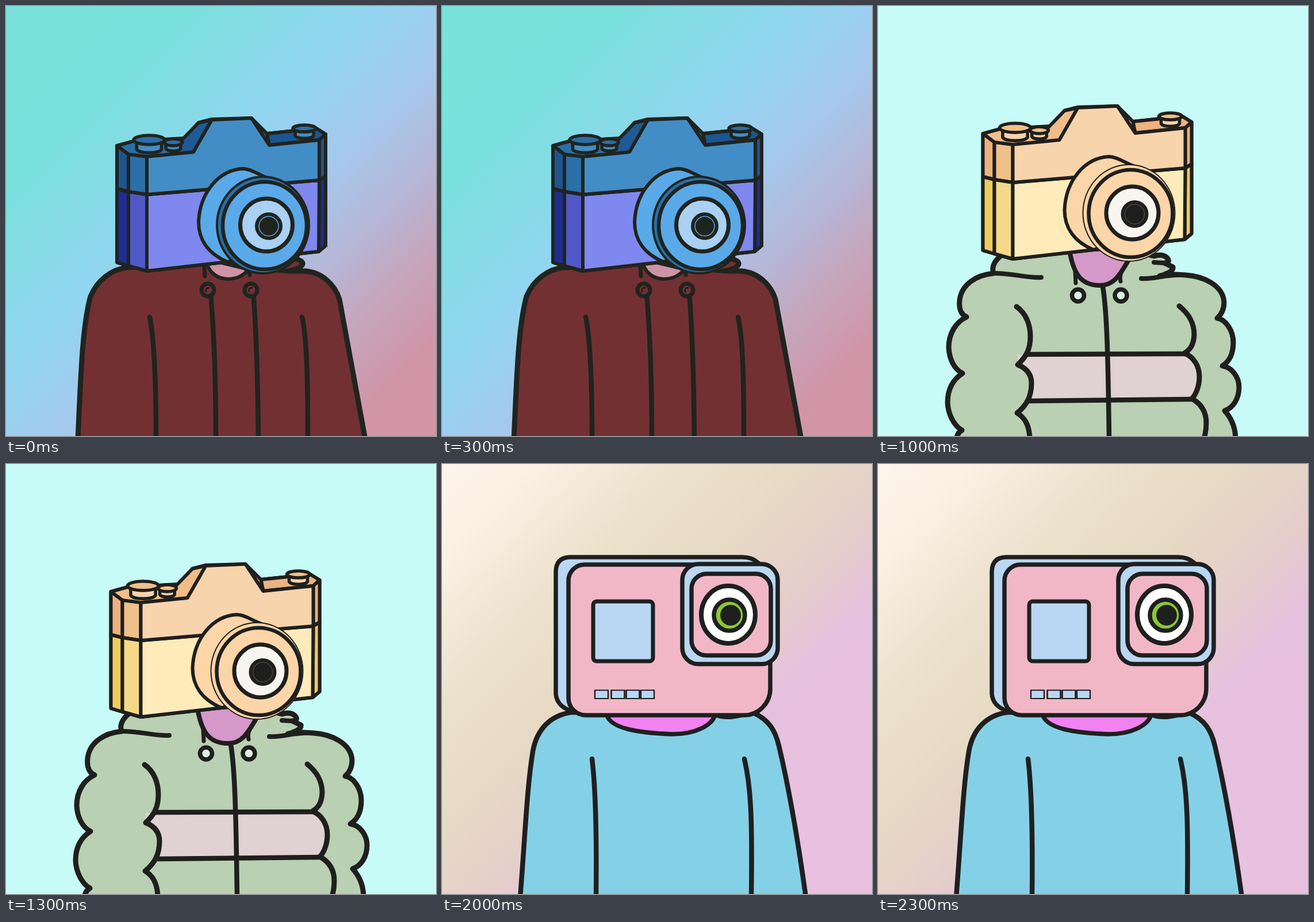
These frames come from a looping animation (748 by 748 pixels, 2500 ms). An HTML page with a canvas:

```html
<!DOCTYPE html>
<html>
<head>
<meta charset="utf-8">
<style>
  html, body { margin: 0; width: 100%; height: 100%; overflow: hidden; }
  canvas { display: block; }
</style>
</head>
<body>
<canvas id="stage" width="748" height="748"></canvas>
<script>
const SIZE = 748, HOLD = 500;
const ctx = document.getElementById('stage').getContext('2d');
ctx.lineJoin = ctx.lineCap = 'round';
let ink = '#20231f';

function paint(path, fill, width) {
  if (fill) { ctx.fillStyle = fill; ctx.fill(path); }
  if (width) { ctx.strokeStyle = ink; ctx.lineWidth = width; ctx.stroke(path); }
}
const shape = (d, fill, width = 6) => paint(new Path2D(d), fill, width);
const line = (d, width = 8) => shape(d, null, width);

function oval(x, y, rx, ry, fill, width = 6) {
  const path = new Path2D();
  path.ellipse(x, y, rx, ry, 0, 0, 7);
  paint(path, fill, width);
}
function box(x, y, w, h, r, fill, width = 7) {
  const path = new Path2D();
  path.roundRect(x, y, w, h, r);
  paint(path, fill, width);
}
function ring(x, y, r, color, width) {
  const keep = ink;
  ink = color;
  oval(x, y, r, r, null, width);
  ink = keep;
}
function backdrop(diagonal, stops) {
  const g = ctx.createLinearGradient(0, 0, diagonal ? SIZE : 0, SIZE);
  stops.forEach(([at, color]) => g.addColorStop(at, color));
  ctx.fillStyle = g;
  ctx.fillRect(0, 0, SIZE, SIZE);
}

// Round dial: a drum under a wider rim.
function dial(x, y, rx, ry, depth, side, top) {
  const b = rx * .8;
  shape(`M${x - b},${y} v${depth * .75} c${b * .2},${depth * .35} ${b * 1.8},${depth * .35} ${2 * b},0 v${-depth * .75}Z`, side, 5.5);
  oval(x, y, rx, ry, top, 5.5);
}

function reflexCamera(c) {
  shape('M193,243 L222,235 L310,230 L335,203 L358,197 L427,195 L454,222 L540,213 L556,223 V417 L544,427 L245,461 L193,446Z', c.top);
  shape('M454,222 L540,213 L556,223 L545,233 L458,242Z', c.dark);
  shape('M193,243 L213,258 V323 L193,318Z', c.dark);
  shape('M213,258 L245,262 V328 L213,323Z', c.top);
  shape('M193,318 L213,323 V452 L193,446Z', c.lowDark);
  shape('M213,323 L245,328 V461 L213,452Z', c.lowSide);
  shape('M545,233 L556,223 V296 L545,303Z', c.dark);
  shape('M545,303 L556,296 V417 L544,427Z', c.lowDark);
  shape('M245,328 L545,303 L544,427 L245,461Z', c.low);
  shape('M310,229 L335,203 L358,198 L326,254 L304,254Z', c.prism, 0);
  line('M308,231 L335,203 L358,198', 6);
  shape('M245,262 L326,254 L358,198 L427,195 L458,242 L545,233 V303 L245,328Z', c.front);
  dial(249, 233, 27, 8, 22, c.front, c.top);
  dial(291, 237, 16, 6, 15, c.front, c.top);
  dial(519, 213, 20, 6, 17, c.front, c.top);
  shape('M385,445 C350,430 335,405 335,376 C337,325 370,285 412,283 C426,283 438,293 455,299 L455,430Z', c.lens);
  oval(447, 381, 80, 84, c.rim, c.rimWidth);
  oval(450, 382, 73, 76, c.lens, 6.5);
  oval(453, 381, 45.5, 46, c.eye, 7);
  oval(457, 383, 21, 21, c.iris, 6);
  oval(458, 383, 15, 15, ink, 0);
  ring(457, 383, 17, c.glint, 1.5);
}

function pufferJacket(main, stripe, neck, button) {
  shape(`M212,436 C200,446 198,457 201,465 C170,468 145,485 142,512 C140,530 147,538 154,541
    C135,550 123,570 123,594 C124,615 133,632 147,639 C130,650 121,668 121,690
    C122,710 132,730 146,738 Q138,742 136,754 H622 C622,730 613,715 603,704
    C618,699 628,683 628,663 C628,645 615,628 599,626 C612,618 618,605 618,585
    C618,565 605,545 590,543 C597,537 602,527 602,515 C600,485 565,470 535,468
    L500,466 C508,464 514,459 513,454 L498,447 Q507,447 505,441 C500,432 488,432 480,435 L440,425 L220,422Z`, main, 9);
  shape('M243,607 L533,605 C548,610 559,625 559,645 C559,663 552,677 546,684 L260,687 Q268,670 266,655 C266,640 258,632 243,624Z', stripe, 0);
  line('M262,606 L533,605 M264,687 L546,684', 8.5);
  line('M201,465 C230,464 262,474 284,472 M458,474 C480,476 500,466 535,468 M480,446 L498,447 L513,455 Q511,464 490,469', 8);
  line('M241,523 C258,535 265,555 265,575 C265,597 258,610 243,624 C258,630 267,640 267,656 C267,680 258,695 242,708 C255,716 263,728 264,752', 9);
  line('M524,522 C540,535 550,550 550,572 C549,590 543,598 533,604 C548,610 559,625 559,645 C559,663 552,677 546,683 C562,692 571,705 571,725 Q571,740 567,752', 9);
  shape('M333,425 C340,465 352,485 384,486 C412,487 422,465 437,440 V420Z', neck, 8);
  line('M343,462 L344,482 M424,462 Q420,470 422,479', 7);
  line('M391,488 C398,530 400,600 402,752', 8.5);
  for (const x of [348, 422.5]) oval(x, 503.5, 10.5, 10.5, button, 7.5);
}

function capeScene() {
  ink = '#20241f';
  backdrop(true, [[0, '#78e2da'], [.2, '#78e1db'], [.43, '#92d5f0'], [.56, '#a5c9ee'],
    [.7, '#b9b3d2'], [.76, '#c4a8c0'], [.88, '#d096a8'], [1, '#d494a4']]);
  shape('M125,754 C130,650 132,560 147,505 C160,475 185,458 210,455 L505,440 C515,443 518,447 515,451 Q508,459 490,461 L520,461 C550,463 572,485 580,510 C595,590 610,670 625,754Z', '#733032', 9);
  line('M470,459 C490,464 510,460 515,451', 7);
  shape('M347,440 C352,466 370,475 387,475 C402,474 412,470 422,458Z', '#cf93a4', 6);
  line('M345,455 L346,470 M423,462 L424,468', 7);
  line('M250,541 C258,580 261,660 261,752 M356,500 C362,570 365,650 365,752 M430,495 C435,560 438,650 439,752 M515,541 C524,580 525,660 525,752', 8.5);
  for (const x of [351, 426]) {
    oval(x, 494, 11, 11, '#733032', 7);
    line(`M${x - 3},497 q-2,-6 5,-7`, 3);
  }
  reflexCamera({
    front: '#438dc6', top: '#2a6fa8', dark: '#1d5590', prism: '#205a96',
    low: '#7f88ef', lowSide: '#5058c8', lowDark: '#1f2c93',
    lens: '#5aa9e8', rim: '#2a6fa8', rimWidth: 4, eye: '#aad0f3', iris: '#20241f', glint: '#5aa9e8'
  });
}

function camcorderScene() {
  ink = '#27252b';
  const yellow = '#f6f15d', brown = '#9c6522', tan = '#cfa377', skin = '#b0eed3';
  backdrop(true, [[0, '#abde88'], [.27, '#a9dc86'], [.54, '#8db077'], [.68, '#8cab78'], [.8, '#93a684'], [.81, '#9ba98f'], [1, '#adb5a2']]);
  shape('M174,550 C183,600 188,660 183,746 H249 L253,575Z', skin, 7.5);
  shape('M556,575 L595,575 C598,640 592,700 598,754 H537 Q534,730 528,705 L540,640Z', skin, 7.5);
  shape('M288,700 C300,730 298,740 290,754 H525 C511,738 508,725 511,700Z', skin, 7.5);
  line('M426,720 C419,724 420,732 427,735', 3);
  shape(`M325,442 C300,456 280,455 250,453 C208,456 194,482 184,500 C170,520 163,545 158,563
    C170,551 190,550 202,563 C215,577 235,585 258,584 C258,600 264,620 270,632
    C273,650 268,670 273,685 Q270,698 265,708 C285,714 295,712 304,702
    C315,700 318,712 329,712 S340,701 349,701 S360,712 369,712 S380,700 388,700
    S400,712 409,712 S422,700 430,700 S442,714 452,714 S465,700 475,700 S488,711 500,711
    Q520,700 547,697 C540,680 531,665 535,650
    C545,630 560,610 556,586 C575,590 585,582 597,575 Q608,569 621,572
    C618,550 607,515 583,495 Q564,480 540,476 L410,479 Q350,478 325,442Z`, '#fe9a8b', 7.5);
  line('M268,542 C258,560 257,600 268,628 M533,527 C538,555 548,575 557,587', 8);
  line('M258,590 Q256,625 270,647', 7);
  shape('M325,440 C340,468 375,482 412,479 V435Z', skin, 7.5);

  shape('M207,288 L260,275 L266,255 L298,243 L322,249 L352,267 L384,264 L412,296 L408,443 L375,445 L336,433 L312,440 L207,408Z', brown);
  line('M266,255 L352,267 M376,428 V444 M320,306 V418', 6);
  shape('M280,254 L298,246 L314,251 L308,257Z', yellow, 5);
  shape('M344,302 L360,269 L385,264 L411,294Z', yellow);
  shape('M223,300 L306,306 V366 L223,352Z', yellow);
  oval(245, 322, 12, 12.5, tan);
  oval(284, 327, 12, 12.5, tan);
  shape('M330,252 L338,238 L350,240 L344,254Z', yellow, 5);
  shape('M310,253 L328,218 L345,214 L438,231 L447,300 L434,299 L424,251 L338,236 L327,255Z', brown);
  line('M326,219 L345,215 L438,231', 9);
  shape('M441,272 L460,275 L467,299 H446Z', yellow);
  shape('M458,221 L530,225 C555,228 566,240 566,256 C563,275 545,284 525,282 L455,272 C440,267 437,255 438,243 C440,228 448,221 458,221Z', yellow, 7);
  shape('M420,305 C383,298 358,335 358,370 C358,405 378,432 412,440Z', yellow, 7);
  shape('M405,318 Q407,305 422,302 L595,290 L615,293 L440,312 L428,484 L405,470Z', '#85541c', 7);
  shape('M425,302 L595,290 L615,293 L440,309Z', ink, 4);
  shape('M442,311 L614,292 Q632,292 632,308 L630,450 Q628,465 612,467 L445,484 Q427,484 426,468 L428,326 Q429,313 442,311Z', yellow, 7);
  shape('M450,336 L612,320 V447 L450,463Z', tan);
  oval(532.5, 391, 59.5, 60.5, '#fbfbfb');
  oval(539.5, 393.5, 27, 26, '#d04a36');
  oval(540.5, 393.5, 16, 16, ink, 3);
}

function puffyReflexScene() {
  ink = '#1f1f1d';
  ctx.fillStyle = '#c7fbf8';
  ctx.fillRect(0, 0, SIZE, SIZE);
  pufferJacket('#b9d0b2', '#e0d2d2', '#d598c9', '#dcefe2');
  ctx.save();
  ctx.translate(-10.5, -21);
  reflexCamera({
    front: '#f8d4ad', top: '#f0c08a', dark: '#ecb280', prism: '#f0bd88',
    low: '#ffebba', lowSide: '#f5d988', lowDark: '#eecb60',
    lens: '#fcd5a8', rim: '#fcd5a8', rimWidth: 2, eye: '#f6f5f0', iris: '#1a1a1a', glint: '#4a4a48'
  });
  ctx.restore();
}

function puffyFinderScene() {
  const teal = '#9ad6d4', pale = '#c4f4f0', shade = '#7fc3c3';
  backdrop(false, [[0, '#b289ea'], [.08, '#b889ec'], [.18, '#cf90ee'], [.27, '#df98f0'], [.38, '#f1a4f3'],
    [.48, '#f8aef5'], [.56, '#efb0f4'], [.65, '#d6b8f4'], [.782, '#b9c5f6'], [.783, '#a0cdf7'], [1, '#72def6']]);
  ink = '#221f20';
  pufferJacket('#d7adc1', '#cdd0e3', '#85dfe4', '#e6bfd0');
  ink = '#222725';
  shape('M196,217 Q205,210 255,209 L352,190 L517,177 L566,187 V400 Q565,412 552,414 L420,430 C330,443 260,448 198,440Z', '#e6917a', 7);
  shape('M196,217 Q205,210 255,209 L352,200 L384,220 V206 L566,187 V262 L395,280 C330,290 270,293 198,289Z', teal);
  shape('M196,219 Q205,210 255,209 L360,201 L384,220 C330,224 240,230 196,222Z', shade);
  shape('M352,190 L517,177 L566,187 L380,206Z', shade);
  shape('M352,190 L380,206 L384,220 L360,204Z', shade, 5);
  dial(275, 205, 24, 6, 15, teal, pale);
  dial(333, 203, 32, 8, 16, teal, pale);
  shape('M435,211 L478,208 L480,246 L436,249Z', pale);
  shape('M499,200 L552,196 V248 L500,252Z', pale);
  shape('M420,418 C380,408 362,385 362,350 C365,300 395,262 440,261 C455,261 465,267 480,270 L495,400Z', pale, 7);
  oval(483, 353, 78, 83, pale, 2.5);
  oval(487, 353, 72, 77, pale, 7);
  oval(489, 357, 46, 46, '#e0fcfb', 7);
  oval(492, 357, 19, 20, ink, 5);
  ring(492, 357, 16, '#a982d8', 2);
}

function actionCameraScene() {
  ink = '#1f1f20';
  const blue = '#b9d7f2', pink = '#f2b7c6';
  backdrop(true, [[0, '#fff4ea'], [.1, '#fdf1e6'], [.27, '#ede2cd'], [.42, '#e6dac4'], [.56, '#e5cdcb'], [.66, '#e6c1de'], [1, '#e8c1e0']]);
  shape('M136,754 C145,640 148,560 158,500 C165,460 190,437 225,432 H540 C570,445 580,465 586,490 C605,570 620,660 633,754Z', '#84d1e7', 8.5);
  line('M261,513 C268,570 269,660 268,752 M526,513 C537,560 540,610 538,752', 8.5);
  shape('M286,432 C287,462 350,468 400,470 C440,470 473,455 476,432Z', '#f083f0', 7.5);
  line('M478,438 Q495,444 520,438', 6);
  shape('M550,172 Q540,162 522,162 H222 Q198,163 198,188 V400 Q200,422 226,430 L300,420Z', blue, 7.5);
  box(220, 175, 351, 262, [28, 28, 46, 30], pink, 7.5);
  box(418, 174, 166, 174, 28, blue, 7.5);
  box(434, 191, 138, 142, 26, pink, 7.5);
  oval(498, 262, 47, 50, '#fff', 8);
  oval(500, 263, 27, 27, '#8cc832', 7.5);
  oval(502, 263, 17, 17, ink, 2);
  box(263, 239, 104, 104, 6, blue, 7);
  for (const x of [266, 294.5, 320.5, 346]) {
    box(x, 393.5, 23, 14.5, 0, blue, 1.8);
    line(`M${x},394 v14 m23,-14 v14`, 2.4);
  }
}

const scenes = [capeScene, camcorderScene, puffyReflexScene, puffyFinderScene, actionCameraScene];
let shown = -1;
function tick() {
  const now = Math.floor(performance.now() / HOLD) % scenes.length;
  if (now !== shown) scenes[shown = now]();
  requestAnimationFrame(tick);
}
tick();
</script>
</body>
</html>
```
